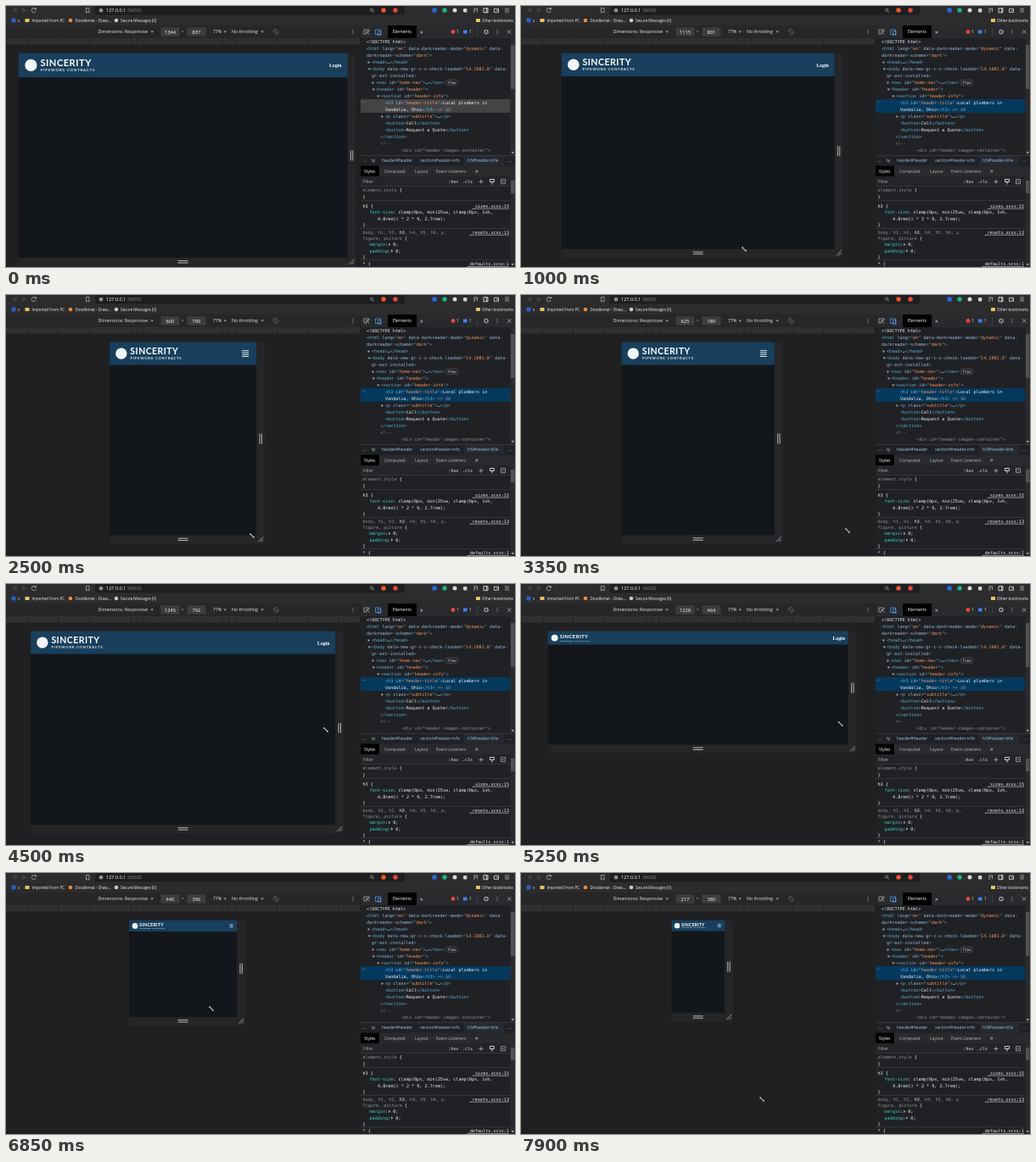
These frames come from a looping animation (600x308 px, 8 s). An HTML page:

```html
<!DOCTYPE html>
<html lang="en">
<head>
<meta charset="utf-8">
<title>Responsive resize</title>
<style>
  html, body { margin: 0; height: 100%; overflow: hidden; background: #202023; }
  svg { display: block; width: 600px; height: 308px; }
  text { white-space: pre; font-family: "Open Sans", sans-serif; }
  .mono { font-family: "DejaVu Sans Mono", monospace; }
  .brand { font-family: Lato, sans-serif; font-weight: 700; }
  .serif { font-family: "Liberation Serif", serif; font-weight: 700; }
</style>
</head>
<body>
<svg id="stage" viewBox="0 0 600 308"></svg>
<script>
const LOOP = 8000, STEP = 50, ZOOM = 0.2885, CENTER = 208.7, TOP = 55.7;
const stage = document.getElementById('stage');

function add(tag, attrs, parent = stage) {
  const el = document.createElementNS('http://www.w3.org/2000/svg', tag);
  set(el, attrs);
  parent.append(el);
  return el;
}
function set(el, attrs) {
  for (const name in attrs) el.setAttribute(name, attrs[name]);
}
const group = (parent) => add('g', {}, parent);
const rect = (x, y, width, height, fill, extra, parent) =>
  add('rect', { x, y, width, height, fill, ...extra }, parent);
const dot = (cx, cy, r, fill, parent) => add('circle', { cx, cy, r, fill }, parent);
const stroke = (d, color = '#aaa', width = 0.7, parent) =>
  add('path', { d, stroke: color, 'stroke-width': width, fill: 'none' }, parent);
// y is the vertical middle of the line
function text(x, y, string, size, fill = '#e8eaec', extra, parent) {
  const el = add('text', { x, y: y + size * 0.36, 'font-size': size, fill, ...extra }, parent);
  el.textContent = string;
  return el;
}
const kebab = (x, y) => [-2, 0, 2].forEach(d => dot(x, y + d, 0.6, '#b5b5b5'));
const caret = (x, y, open = true) =>
  add('path', { d: `M${x} ${y}` + (open ? 'h3.4l-1.7 2.4z' : 'v3.4l2.4-1.7z'), fill: '#a0a4a8' });

// Code lines: segments split by "|", each starting with a colour key
const COLORS = { t: '#5db0d7', a: '#9bbbdc', v: '#f29766', w: '#eef0f2', g: '#8d9297', p: '#35d4c7' };
function code(x, y, line) {
  const el = text(x, y, '', 5.13, '#fff', { class: 'mono' });
  for (const part of line.split('|'))
    add('tspan', { fill: COLORS[part[0]] }, el).textContent = part.slice(1);
}

function drawBrowserBar() {
  rect(0, 0, 600, 23, '#2c2c2f');
  rect(105, 0, 365, 10.5, '#1e1e21', { rx: 2 });
  stroke('M12 2.8v4.6l-4-2.3zM19.5 2.8v4.6l4-2.3z', '#5e5e62');
  stroke('M35 3.6a2.6 2.6 0 1 0 .2 2.6M35.4 2v2h-2', '#ccc');
  stroke('M94.5 2.5h3.6v5.6l-1.8-1.4-1.8 1.4z', '#bbb');
  dot(112, 5.2, 2.4, '#8c8c90');
  text(118, 5, '127.0.0.1', 5.5, '#fff');
  text(142.5, 5, ':56002', 5.5, '#8b8b8b');
  add('circle', { cx: 431, cy: 4.6, r: 1.6, fill: 'none', stroke: '#aaa', 'stroke-width': 0.7 });
  stroke('M432.2 5.8l1.8 1.8');
  dot(445, 5, 2.7, '#f0562b');
  dot(459, 5, 2.7, '#e4473d');

  // Extension buttons
  rect(502.6, 2.5, 5, 5, '#2c6be0');
  dot(517, 5, 2.7, '#19b487');
  dot(529, 5, 2.5, '#d8d8d8');
  rect(539, 3, 4.4, 4.4, '#d0d0d0', { rx: 1 });
  stroke('M551 3h5m-5 2h3m-3 2h2M555.5 3v4', '#ccc');
  stroke('M563 2.7h5v5h-5zM566.5 2.7v5', '#ddd', 0.9);
  stroke('M575.5 3.2h5v4.2h-5zm2.5 2h2.5', '#ccc', 0.9);
  stroke('M588 3h5m-5 2h5m-5 2h5', '#bbb');

  dot(9, 17, 2.7, '#2a5fc4');
  const label = (x, string) => text(x, 17, string, 4.5, '#eee');
  label(14, 's');
  const folder = x => rect(x, 15, 5, 4, '#e9c45c', { rx: 0.6 });
  folder(22.5);
  label(30.5, 'Imported From PC');
  dot(76, 17, 2.3, '#ef8b37');
  label(81.5, 'Doodlemat - Draw,...');
  dot(130, 17, 2.3, '#c9c9c9');
  label(135, 'Secure Messages (0)');
  folder(554);
  label(561, 'Other bookmarks');
}

function drawDeviceBar() {
  rect(0, 23, 417, 15, '#27272a');
  rect(0, 38, 417, 7.5, '#303033');
  for (const width of [320, 375, 425, 768, 1024, 1270])
    for (const side of [-1, 1])
      rect(CENTER + side * width * ZOOM / 2, 38, 0.6, 7.5, '#1c1c1e');
  text(108.5, 30.5, 'Dimensions: Responsive', 5.2);
  caret(170.5, 29.4);
  const field = x => {
    rect(x, 25.3, 22, 10.4, '#3d3d40');
    return text(x + 11, 30.5, '', 5.7, '#fff', { 'text-anchor': 'middle' });
  };
  const inputs = [field(182.5), field(213.5)];
  text(206.8, 30.5, '×', 5.2, '#aaa');
  text(244, 30.5, '77%', 5.2);
  caret(256.5, 29.4);
  text(266, 30.5, 'No throttling', 5.2);
  caret(300.5, 29.4);
  stroke('M315.8 31.5a2.5 2.5 0 0 1 4-3M320.6 29.3a2.5 2.5 0 0 1-4 3M316.6 28.6l3.3 3.6', '#777');
  kebab(409, 30.5);
  return inputs;
}

function scrollbar(top, bottom, thumbTop, thumbHeight) {
  rect(594.5, top, 5.5, bottom - top, '#2b2b2e');
  rect(595, thumbTop, 4.5, thumbHeight, '#515154');
  caret(595.6, bottom - 4);
}

function drawElements() {
  rect(418, 23, 182, 285, '#202124');
  rect(418, 23, 182, 15, '#292a2d');
  rect(450, 23, 34, 15, '#000');
  stroke('M425 33h-3v-5h6v2M425 30l3.5 3.5M425 30v3m0-3h3', '#bbb');
  stroke('M435.5 28h6v5.5h-6zM438.5 29.8h3.5v4.4h-3.5z', '#55a3f2');
  text(456, 30.5, 'Elements', 5.1, '#fff');
  text(488, 30, '»', 7);
  dot(527, 30.5, 2.4, '#e8453c');
  text(531, 30.5, '1', 5);
  rect(539, 28.4, 4.6, 4.2, '#3f83ee', { rx: 0.6 });
  text(546, 30.5, '1', 5);
  rect(555.5, 26, 0.5, 9, '#55565a');
  add('circle', { cx: 566, cy: 30.5, r: 2.1, fill: 'none', stroke: '#bbb', 'stroke-width': 1.5, 'stroke-dasharray': '1.25 .4' });
  kebab(579, 30.5);
  stroke('M591 28.3l4.4 4.4m0-4.4l-4.4 4.4', '#ccc');

  const selection = rect(418, 110, 176.5, 16, '#434346');
  const lines = [
    [425, 'w<!DOCTYPE html>'],
    [425, 't<html |alang|t="|ven|t" |adata-darkreader-mode|t="|vdynamic|t" |adata-'],
    [425, 'adarkreader-scheme|t="|vdark|t">'],
    [431, 't<head>|w…|t</head>', false],
    [431, 't<body |adata-new-gr-c-s-check-loaded|t="|v14.1081.0|t" |adata-', true],
    [431, 'agr-ext-installed|t>'],
    [436, 't<nav |aid|t="|vhome-nav|t">|w…|t</nav>', false],
    [436, 't<header |aid|t="|vheader|t">', true],
    [441.5, 't<section |aid|t="|vheader-info|t">', true],
    [447, 't<h3 |aid|t="|vheader-title|t">|wLocal plumbers in'],
    [447, 'wVandalia, Ohio|t</h3>|g == $0'],
    [447, 't<p |aclass|t="|vsubtitle|t">|w…|t</p>', false],
    [447, 't<button>|wCall|t</button>'],
    [447, 't<button>|wRequest a Quote|t</button>'],
    [441.5, 't</section>'],
    [441.5, 'g<!--'],
    [441.5, 'g        <div id="header-images-container">'],
  ];
  lines.forEach(([x, line, open], i) => {
    const y = 42.5 + i * 8;
    code(x, y, line);
    if (open !== undefined) caret(x - 4.4, y - (open ? 1 : 1.7), open);
  });
  text(419, 113, '⋯', 5, '#ddd');
  rect(518, 87, 15, 6.6, '#26272a', { rx: 3, stroke: '#606368', 'stroke-width': 0.5 });
  text(525.5, 90.2, 'flex', 4.2, '#eee', { class: 'mono', 'text-anchor': 'middle' });
  scrollbar(38, 176, 46, 52);
  return selection;
}

function drawStyles() {
  rect(418, 176, 182, 13, '#202124');
  rect(418, 176, 182, 0.6, '#46474b');
  rect(540, 177, 47, 11, '#262a30');
  const crumbs = [[421, '...'], [431, 'ty'], [443, 'header#header'], [488, 'section#header-info'], [544, 'h3#header-title'], [592, '...']];
  crumbs.forEach(([x, label], i) => text(x, 182.3, label, 5, i > 1 && i < 5 ? '#9cc3e0' : '#d0d3d6'));

  rect(418, 188.6, 182, 12.6, '#292a2d');
  rect(418, 188.6, 22, 12.6, '#000');
  [[422, 'Styles'], [446, 'Computed'], [482, 'Layout'], [507, 'Event Listeners']]
    .forEach(([x, label], i) => text(x, 195, label, 5, i ? '#b6b9bd' : '#fff'));
  text(553, 194.5, '»', 7);

  rect(418, 201.2, 182, 11.3, '#242528');
  text(421, 207.3, 'Filter', 5, '#b0b3b7');
  text(521.5, 207.3, ':hov', 5, '#e8eaec', { class: 'mono' });
  text(538, 207.3, '.cls', 5, '#e8eaec', { class: 'mono' });
  stroke('M557.5 207.3h5m-2.5-2.5v5', '#ccc');
  stroke('M570.5 204.5h5v3h-5zM573 207.5v3', '#ccc', 1);
  stroke('M583.5 204.7h5v5h-5zM587 207.2h-2.4', '#aaa', 0.8);

  [212.5, 229.3, 262.2, 299.6].forEach(y => rect(418, y, 176.5, 0.5, '#46474b'));
  [
    [420.5, 217.5, 'gelement.style |w{'],
    [420.5, 225.3, 'w}'],
    [420.5, 236, 'wh3 {'],
    [428.5, 243.3, 'pfont-size|w: clamp(0px, min(25vw, clamp(0px, 1vh,'],
    [438, 250.8, 'w4.8rem)) * 2 * 9, 2.7rem);'],
    [420.5, 258, 'w}'],
    [420.5, 267, 'gbody, h1, h2, |wh3|g, h4, h5, h6, p,'],
    [420.5, 274, 'gfigure, picture |w{'],
    [428.5, 281.5, 'pmargin|w:  0;'],
    [428.5, 289, 'ppadding|w:  0;'],
    [420.5, 296.3, 'w}'],
    [420.5, 304.5, 'w* {'],
  ].forEach(line => code(...line));
  caret(451, 279.8, false);
  caret(454, 287.3, false);
  [[236, '_sizes.scss:15'], [267, '_resets.scss:13'], [304.5, '_defaults.scss:1']].forEach(([y, label]) =>
    text(593, y, label, 5.13, '#eceef0', { class: 'mono', 'text-anchor': 'end', 'text-decoration': 'underline' }));
  scrollbar(201.2, 308, 206, 15);
}

// Simulated device, with its parts placed by render()
rect(0, 45, 418, 263, '#202023');
const frame = rect(0, TOP, 0, 0, '#262629');
const page = rect(0, TOP, 0, 0, '#13171b');
const header = rect(0, TOP, 0, 0, '#183f5c');
const logo = group();
dot(14.6, 14.2, 7.1, '#f4f7f9', logo);
text(25.7, 11, 'SINCERITY', 11.2, '#fff', { class: 'brand', 'letter-spacing': 0.45 }, logo);
text(25.9, 19.8, 'PIPEWORK CONTRACTS', 4.4, '#e6edf2', { class: 'brand', 'letter-spacing': 0.79 }, logo);
const login = text(0, 0, 'Login', 5.8, '#fff', { class: 'serif', 'text-anchor': 'end' });
const menu = group();
stroke('M-8.4-3.6h8.4m-8.4 2.4h8.4m-8.4 2.4h8.4m-8.4 2.4h8.4', '#f0f3f5', 1, menu);
const sideGrip = stroke('M-1.2-6v12M1.2-6v12', '#b9b9b9', 1);
const bottomGrip = stroke('M-6-1.2h12M-6 1.2h12', '#b9b9b9', 1);
const cornerGrip = stroke('M-3 3l6-6M0 3l3-3', '#b9b9b9', 0.8);
drawBrowserBar();
const [widthInput, heightInput] = drawDeviceBar();
const selection = drawElements();
drawStyles();
const cursor = group();
add('path', {
  d: 'M-2.8-2.8h2.3l-.8.8 3.3 3.3.8-.8v2.3h-2.3l.8-.8-3.3-3.3-.8.8z',
  fill: '#fff', stroke: '#000', 'stroke-width': 0.3,
}, cursor);

// time, device width, device height, pointer x, pointer y
const KEYS = [
  [350, 1344, 837, 408, 302],
  [1000, 1115, 801, 263, 287],
  [1700, 721, 792, 299, 286.5],
  [2500, 600, 790, 290, 284],
  [3350, 625, 789, 385, 278],
  [4500, 1245, 792, 377, 172],
  [5200, 1230, 470, 378, 165],
  [5950, 1141, 415, 260, 168],
  [6900, 420, 395, 242, 160],
  [7900, 217, 380, 284, 267],
];

// Slope through a key, flat where the value turns round
function slope(i, column) {
  if (!KEYS[i - 1] || !KEYS[i + 1]) return 0;
  const rate = k => (KEYS[k + 1][column] - KEYS[k][column]) / (KEYS[k + 1][0] - KEYS[k][0]);
  const a = rate(i - 1), b = rate(i);
  return a * b > 0 ? 2 * a * b / (a + b) : 0;
}
function valueAt(time, column) {
  const last = KEYS.length - 1;
  if (time <= KEYS[0][0]) return KEYS[0][column];
  if (time >= KEYS[last][0]) return KEYS[last][column];
  const i = KEYS.findIndex(key => key[0] > time) - 1;
  const span = KEYS[i + 1][0] - KEYS[i][0], u = (time - KEYS[i][0]) / span;
  const ease = u * u * (3 - 2 * u);
  return KEYS[i][column] * (1 - ease) + KEYS[i + 1][column] * ease
    + span * u * (1 - u) * ((1 - u) * slope(i, column) - u * slope(i + 1, column));
}

const move = (el, x, y, scale = 1) => set(el, { transform: `translate(${x} ${y}) scale(${scale})` });

function render(time) {
  const deviceWidth = Math.round(valueAt(time, 1)), deviceHeight = Math.round(valueAt(time, 2));
  const width = deviceWidth * ZOOM, height = deviceHeight * ZOOM;
  const left = CENTER - width / 2, right = left + width, bottom = TOP + height;
  const bar = deviceHeight * 0.034, scale = bar / 28.5;
  const dragging = time >= 350, wide = deviceWidth > 680;

  set(frame, { x: left, width: width + 10, height: height + 10 });
  set(page, { x: left, width, height });
  set(header, { x: left, width, height: bar });
  move(logo, left, TOP, scale);
  set(login, { x: right - bar * 0.25, y: TOP + bar / 2 + 2.4, visibility: wide ? 'visible' : 'hidden' });
  set(menu, { visibility: wide ? 'hidden' : 'visible' });
  move(menu, right - bar * 0.34, TOP + bar / 2, scale);
  move(sideGrip, right + 5, TOP + height / 2);
  move(bottomGrip, CENTER, bottom + 4.7);
  move(cornerGrip, right + 5, bottom + 4.7);
  widthInput.textContent = deviceWidth;
  heightInput.textContent = deviceHeight;
  set(selection, { fill: dragging ? '#04395e' : '#434346' });
  set(cursor, { visibility: dragging ? 'visible' : 'hidden' });
  move(cursor, valueAt(time, 3), valueAt(time, 4));
}

function tick() {
  render(Math.floor(performance.now() % LOOP / STEP) * STEP);
  requestAnimationFrame(tick);
}
tick();
</script>
</body>
</html>
```
